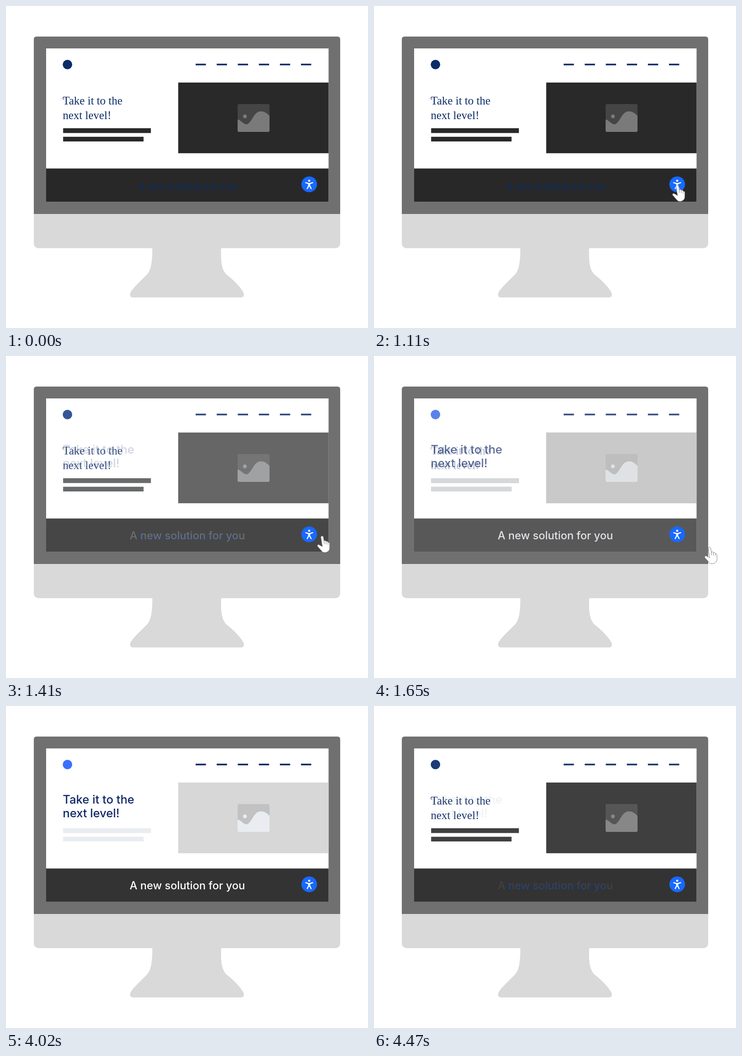
An HTML page that plays this animation: 794 by 706 pixels, repeating every 4.5 s.

```html
<!DOCTYPE html>
<html lang="en">
<head>
<meta charset="utf-8">
<style>
  html, body { margin: 0; width: 100%; height: 100%; overflow: hidden; background: #fff; }
  svg { display: block; width: 794px; height: 706px; }
  .curly { font-family: "Liberation Serif", serif; }
  .clean { font-family: Inter, sans-serif; font-weight: 500; }
</style>
</head>
<body>
<svg viewBox="0 0 794 706">
  <path fill="#d9d9d9" d="M321 530H472C470 568 476 581 484 589C508 608 522 626 522 633Q522 639 514 639H280Q272 639 272 633C272 624 290 608 310 588C320 576 321 552 321 530Z"/>
  <rect x="61" y="400" width="672" height="131" rx="10" fill="#d9d9d9"/>
  <path fill="#707070" d="M61 456V73Q61 67 67 67H727Q733 67 733 73V456Z"/>
  <rect x="88" y="93" width="619.5" height="336.5" fill="#fff"/>
  <g id="before"></g>
  <g id="after"></g>
  <g id="button">
    <circle cx="665" cy="391" r="17.2" fill="#1769ff"/>
    <circle cx="665" cy="383.2" r="2.4" fill="#fff"/>
    <path d="M657.5 387.4L663 389.2H667L672.5 387.4M664 389.5V394L660.8 400.3M666 389.5V394L669.2 400.3M665 390V394.5" fill="none" stroke="#fff" stroke-width="2.5" stroke-linecap="round" stroke-linejoin="round"/>
  </g>
  <g id="hand" stroke="#666" stroke-width=".8" stroke-linejoin="round" stroke-linecap="round">
    <path fill="#fff" d="M9 4C8.5 0 14 0 14.5 3L16 12C17 10 20 10.500 20.300 13C22 11.500 24.300 12.500 24.700 15C27 14 28.300 16 28.300 18V27C28.300 33 24 36 19.500 37C14 37.500 12 36 10 33L2 24C0 21 3 19 5 20L12 24Z"/>
    <path fill="none" d="M16 12L16.500 18M20.300 13L20.700 18.500M24.700 15V19.500"/>
  </g>
</svg>
<script>
const LOOP = 4500, STEP = 30;
const el = id => document.getElementById(id);
const ramp = (t, from, to) => Math.min(1, Math.max(0, (t - from) / (to - from)));
const smooth = x => x * x * (3 - 2 * x);

function page(c) {
  const dashes = [0, 1, 2, 3, 4, 5].map(i =>
    `<rect x="${416 + i * 46.2}" y="126.500" width="22.500" height="3.600"/>`).join('');
  return `
    <circle cx="134.800" cy="128.300" r="10.400" fill="${c.logo}"/>
    <g fill="${c.ink}">${dashes}
      <g class="${c.font}" font-size="${c.size}">
        <text x="124.500" y="${c.lines[0]}">Take it to the</text>
        <text x="124.500" y="${c.lines[1]}">next level!</text>
      </g>
      ${c.extra || ''}
    </g>
    <path fill="${c.bars}" d="M125.300 268H317.800V278.500H125.300ZM125.300 286.700H301.700V297H125.300Z"/>
    <rect x="377.700" y="167.800" width="329.800" height="155" fill="${c.photo}"/>
    <rect x="508" y="215" width="70" height="61" rx="3" fill="${c.sky}"/>
    <path fill="${c.hill}" d="M508 249C516 250 520 259.500 528 259.500C540 256 543 231 559 231C568 231 573 236 578 241V273Q578 276 575 276H511Q508 276 508 273Z"/>
    <circle cx="524" cy="242" r="4.200" fill="${c.hill}"/>
    <rect x="88" y="356.300" width="619.500" height="73.200" fill="#282828"/>
    <text class="${c.font}" x="397.800" y="${c.footY}" font-size="${c.footSize}" text-anchor="middle" fill="${c.footInk}">A new solution for you</text>`;
}

el('before').innerHTML = page({
  font: 'curly', size: 25, lines: [216, 248], footSize: 23.8, footY: 403,
  logo: '#0d2c66', ink: '#0d2c66', footInk: '#0d2c66',
  bars: '#292929', photo: '#292929', sky: '#454545', hill: '#7a7a7a',
  extra: '<path d="M126 200C123 203 126 207 128 204" fill="none" stroke="#0d2c66"/>'
});
el('after').innerHTML = page({
  font: 'clean', size: 25.6, lines: [214, 244], footSize: 23.7, footY: 401.5,
  logo: '#2f69ff', ink: '#001a5c', footInk: '#fff',
  bars: '#e9edf2', photo: '#d6d6d6', sky: '#c0c0c0', hill: '#e9edf2'
});

function draw(now) {
  const t = Math.floor(now % LOOP / STEP) * STEP;

  const fade = ramp(t, 1320, 1830) - ramp(t, 3990, 4500);
  el('before').setAttribute('opacity', 1 - fade);
  el('after').setAttribute('opacity', fade);

  // Distance of the hand from the button: 1 is away, 0 is on it
  const away = t < 1000 ? 1 - smooth(ramp(t, 0, 540)) : smooth(ramp(t, 1090, 2170));
  const press = 1 - 0.1 * Math.sin(Math.PI * ramp(t, 555, 1095)) ** 2;
  const scale = `translate(665 391) scale(${press}) translate(-665 -391)`;
  el('button').setAttribute('transform', scale);
  el('hand').setAttribute('transform',
    `${scale} translate(${653.3 + 134 * away} ${391.3 + 143 * away ** 2.6})`);
  el('hand').setAttribute('opacity', ramp(away, 1, 0.93));

  requestAnimationFrame(draw);
}
requestAnimationFrame(draw);
</script>
</body>
</html>
```
